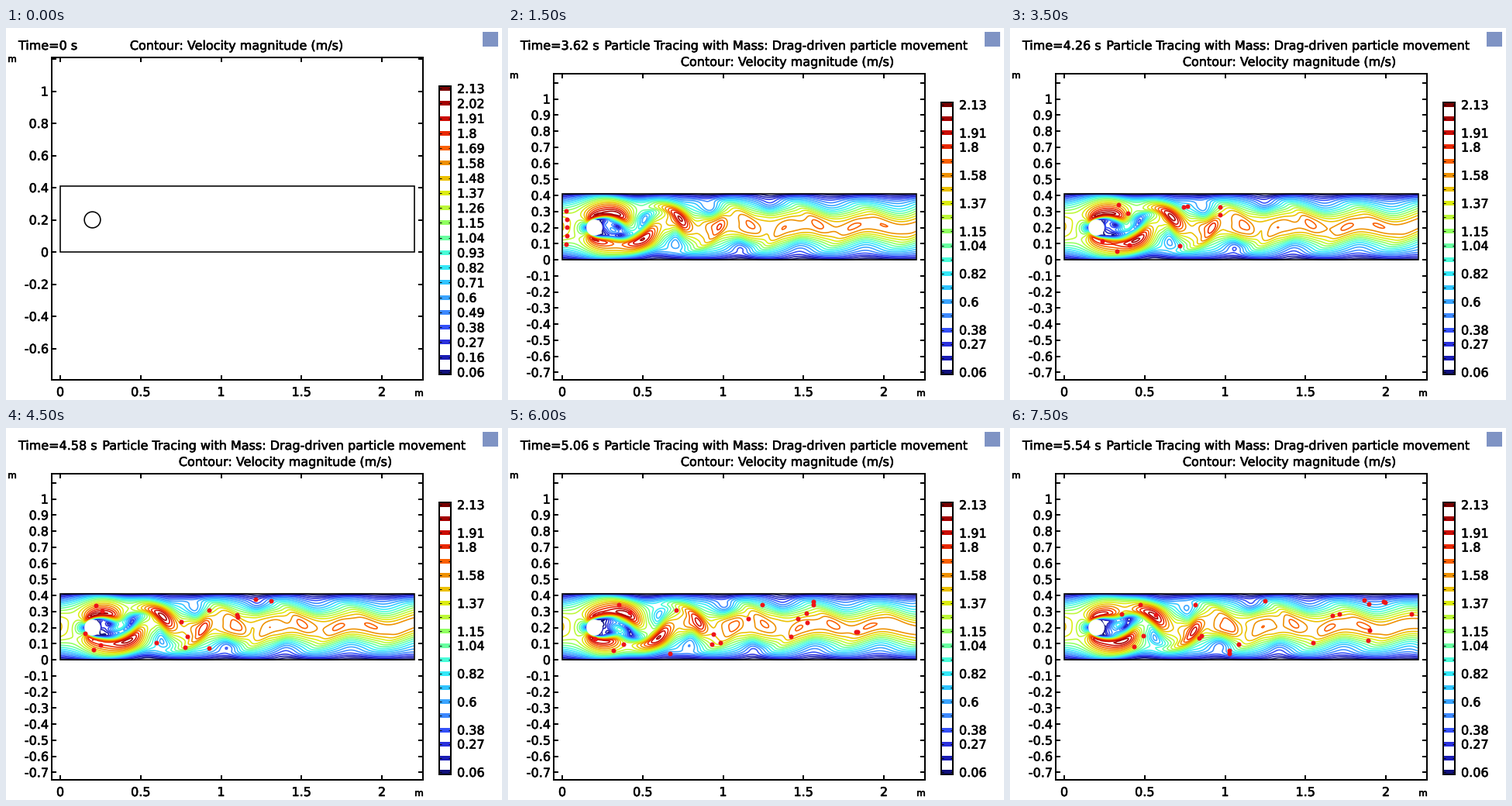
A matplotlib script that plays this animation: 640 px wide and 480 px high, repeating every 8000 ms.

```python
import numpy as np
import matplotlib.pyplot as plt
from matplotlib.animation import FuncAnimation
from matplotlib.patches import Circle, Rectangle
from matplotlib.patheffects import withStroke

# Channel flow past a cylinder at Re = 100 (SI units)
LENGTH, HEIGHT = 2.2, 0.41
CX, CY, R = 0.2, 0.2, 0.05
NU = 0.001
NY = 52
H = HEIGHT / NY
NX = round(LENGTH / H)
DT = 0.0014
STEPS = 3000

# Shedding cycle: upward flow peaks at PROBE_X at PEAK_TIME
PROBE_X, PEAK_TIME, PERIOD = 0.93, 4.58, 0.3406


def laplacian(n, last):
    m = np.diag(np.full(n, -2.0)) + np.eye(n, k=1) + np.eye(n, k=-1)
    m[0, 0], m[-1, -1] = -1, last
    vals, vecs = np.linalg.eigh(m)
    return vals, vecs.astype("f4")


LX, VX = laplacian(NX, -3)
LY, VY = laplacian(NY, -1)
INV = (1 / (LX[:, None] + LY[None, :])).astype("f4")
VXT, VYT = np.ascontiguousarray(VX.T), np.ascontiguousarray(VY.T)


def project(u, v):
    """Remove the divergence in place."""
    div = u[1:] - u[:-1] + v[:, 1:] - v[:, :-1]
    q = VX @ ((VXT @ div @ VY) * INV) @ VYT
    u[1:-1] -= q[1:] - q[:-1]
    u[-1] += 2 * q[-1]
    v[:, 1:-1] -= q[:, 1:] - q[:, :-1]


def grow(f, k):
    """Add two ghost layers; k = 1 when nodes lie on the walls."""
    f = np.concatenate((f[:1], f[:1], f, f[-1:], f[-1:]))
    m = f.shape[1]
    low, high = f[:, k:k + 2][:, ::-1], f[:, m - 2 - k:m - k][:, ::-1]
    return np.concatenate((-low, f, -high), axis=1)


def sweep(w, l2, l1, c, r1, r2):
    """Third-order upwind advection plus diffusion along one axis."""
    s = l1 + r1
    adv = w * (l2 - r2 + 8 * (r1 - l1)) + np.abs(w) * (l2 + r2 - 4 * s + 6 * c)
    return (NU / H ** 2) * (s - 2 * c) - adv * (1 / (12 * H))


def rate(g, a, b):
    c, gx, gy = g[2:-2, 2:-2], g[:, 2:-2], g[2:-2]
    return (sweep(a, gx[:-4], gx[1:-3], c, gx[3:-1], gx[4:])
            + sweep(b, gy[:, :-4], gy[:, 1:-3], c, gy[:, 3:-1], gy[:, 4:]))


def fluid_mask(x, y):
    r = np.hypot(x[:, None] - CX, y[None, :] - CY)
    return np.clip((r - R) / H + 0.8, 0, 1).astype("f4")


def centred(u, v):
    return np.stack((u[1:] + u[:-1], v[:, 1:] + v[:, :-1])) * 0.5


def simulate():
    xf, yf = np.arange(NX + 1) * H, np.arange(NY + 1) * H
    xc, yc = xf[:-1] + H / 2, yf[:-1] + H / 2
    mu, mv = fluid_mask(xf, yc), fluid_mask(xc, yf)
    s = yc / HEIGHT
    inlet = (6 * s * (1 - s)).astype("f4")
    u = mu * inlet
    kick = np.exp(-((xc[:, None] - 0.4) ** 2 + (yf - CY) ** 2) / 0.05 ** 2)
    v = (0.2 * kick).astype("f4") * mv
    v[:, 0] = v[:, -1] = 0
    project(u, v)

    old = None
    early, snaps, probe = None, [], []
    pi, pj = int(PROBE_X / H), round(CY / H)
    for n in range(1, STEPS + 1):
        gu, gv = grow(u, 0), grow(v, 1)
        sv = gv[1:-2] + gv[2:-1]
        su = gu[2:-3] + gu[3:-2]
        ru = rate(gu, u, (sv[:, 2:-3] + sv[:, 3:-2]) * 0.25)
        rv = rate(gv, (su[:, 1:-2] + su[:, 2:-1]) * 0.25, v)
        ou, ov = old or (ru, rv)
        u = (u + DT * (1.5 * ru - 0.5 * ou)) * mu
        v = (v + DT * (1.5 * rv - 0.5 * ov)) * mv
        old = ru, rv
        u[0] = inlet
        v[:, 0] = v[:, -1] = 0
        project(u, v)
        if n == round(1.6 / DT):
            early = centred(u, v)
        if n > STEPS - 800 and n % 4 == 0:
            snaps.append(centred(u, v))
            probe.append(v[pi, pj])

    # keep the last full cycle, starting at an upward zero crossing
    q = np.array(probe) - np.mean(probe)
    ups = np.flatnonzero((q[:-1] < 0) & (q[1:] >= 0)) + 1
    a, b = np.r_[0, len(q) - 1, ups][-2:]
    return early, snaps[a:b]


EARLY, CYCLE = simulate()


def field(t):
    phase = ((t - PEAK_TIME) / PERIOD + 0.25) % 1
    return CYCLE[int(phase * len(CYCLE))]


def sample(f, p):
    g = np.clip(p / H - 0.5, 0, [[NX - 1.01], [NY - 1.01]])
    i, j = g.astype(int)
    a, b = g - np.floor(g)
    return ((1 - a) * ((1 - b) * f[:, i, j] + b * f[:, i, j + 1])
            + a * ((1 - b) * f[:, i + 1, j] + b * f[:, i + 1, j + 1]))


def trace():
    """Five particles every 0.4 s from 3.6 s, dragged along by the flow."""
    step, tau = 0.01, 0.015
    seeds = np.array([np.zeros(5), np.linspace(0.1, 0.3, 5)])
    centre = np.array([[CX], [CY]])
    pos = vel = np.zeros((2, 0))
    path = []
    for n in range(200):
        f = field(3.6 + n * step)
        if n % 40 == 0:
            pos = np.hstack((pos, seeds))
            vel = np.hstack((vel, sample(f, seeds)))
        path.append(pos)
        flow = sample(f, pos)
        vel = flow + (vel - flow) * np.exp(-step / tau)
        pos = pos + vel * step
        # slide along the cylinder instead of entering it
        off = pos - centre
        dist = np.hypot(*off)
        pos = centre + off * np.maximum(1, (R + H) / dist)
        pos[1] = np.clip(pos[1], 0.01, HEIGHT - 0.01)
    return path


PATH = trace()

# Drawing, in pixels
SCALE, X0 = 207.5, 70
LABELS = ("2.13 2.02 1.91 1.8 1.69 1.58 1.48 1.37 1.26 1.15 "
          "1.04 0.93 0.82 0.71 0.6 0.49 0.38 0.27 0.16 0.06").split()
SPARSE = {0, 2, 3, 5, 7, 9, 10, 12, 14, 16, 17, 19}
LEVELS = np.linspace(0.06, 2.13, 20)
COLORS = ("#10107c #1a1cb4 #2a30dc #3450f8 #3a6cff #3c88ff #3aa4ff "
          "#30c4ff #34e8f8 #48fcd8 #68ffa0 #90ff60 #bcf838 #dcec10 "
          "#ecc000 #ee9000 #fa6000 #ea2800 #cc0c04 #a40000 #780000").split()
COLORS.remove("#3a6cff")

GX = np.r_[0, (np.arange(NX) + 0.5) * H, LENGTH] * SCALE + X0
GY = np.r_[0, (np.arange(NY) + 0.5) * H, HEIGHT] * SCALE

fig = plt.figure(figsize=(640 / 72, 480 / 72), dpi=72, facecolor="white")
ax = fig.add_axes([0, 0, 1, 1])


def text(x, y, s, ha="left", size=16):
    ax.text(x, y, s, ha=ha, va="baseline", size=size, family="DejaVu Sans",
            path_effects=[withStroke(linewidth=0.6, foreground="black")])


def line(x, y, w=2):
    ax.plot(x, y, color="black", lw=w, solid_capstyle="butt", zorder=6)


def box(x0, y0, x1, y1, w=2):
    ax.add_patch(Rectangle((x0, y0), x1 - x0, y1 - y0, fill=False,
                           ec="black", lw=w, zorder=6))


def axes_frame(top, base, step, lowest, highest):
    box(59, top, 538, 454)
    for k in range(lowest, highest + 1):
        val = round(k * step, 1)
        y = base - val * SCALE
        line([59, 65], [y, y])
        line([532, 538], [y, y])
        if val <= 1:
            text(55, y + 6, f"{val:g}", "right")
    for k in range(5):
        x = X0 + k * 0.5 * SCALE
        line([x, x], [448, 454])
        line([x, x], [top, top + 6])
        text(x, 475, f"{k * 0.5:g}", "center")
    text(8, top + 6, "m", "center", 12)
    text(533, 475, "m", "center", 12)


def legend(top, shown):
    for i, label in enumerate(LABELS):
        y = top + 3 + i * (441 - top) / 19
        ax.add_patch(Rectangle((559, y - 3), 15, 6, fc=COLORS[19 - i], lw=0))
        line([559, 562], [y, y], 1)
        line([571, 574], [y, y], 1)
        if i in shown:
            text(582, y + 6, label)
    box(559, top, 574, 447)


def geometry(base, edge):
    box(X0, base - HEIGHT * SCALE, X0 + LENGTH * SCALE, base, 1.6)
    ax.add_patch(Circle((X0 + CX * SCALE, base - CY * SCALE), R * SCALE,
                        fc="white", ec=edge, lw=1.6, zorder=4))


def contours(vel, base):
    speed = np.pad(np.hypot(*vel), ((1, 1), (0, 0)), mode="edge")
    speed = np.pad(speed, ((0, 0), (1, 1)))
    ax.contour(GX, base - GY, speed.T, levels=LEVELS, colors=COLORS,
               linewidths=1.6, zorder=2)


def draw(i):
    ax.clear()
    ax.set_xlim(0, 640)
    ax.set_ylim(480, 0)
    ax.axis("off")
    traced = i >= 3
    t = round(3.62 + 0.16 * (i - 3), 2) if traced else 1.6 * i
    base = 299 if traced else 289

    text(16, 28, f"Time={t:g} s")
    caption = "Contour: Velocity magnitude (m/s)"
    if traced:
        short = len(f"{t:g}") < 4
        text(351 if short else 360, 28, "Particle Tracing with Mass: "
             "Drag-driven particle movement", "center")
        text(354 if short else 361, 49, caption, "center")
        axes_frame(59, base, 0.1, -7, 11)
        legend(96, SPARSE)
    else:
        text(298, 28, caption, "center")
        axes_frame(38, base, 0.2, -3, 6)
        legend(75, range(20))
    ax.add_patch(Rectangle((615, 5), 20, 19, fc="#7f93c4", lw=0))

    geometry(base, "none" if i else "black")
    if i:
        contours(EARLY if i == 1 else field(t), base)
    if traced:
        x, y = PATH[2 + 16 * (i - 3)]
        keep = x < LENGTH
        ax.scatter(X0 + x[keep] * SCALE, base - y[keep] * SCALE, s=36,
                   color="#ee1418", lw=0, zorder=5)
    return []


anim = FuncAnimation(fig, draw, frames=16, interval=500, repeat=True,
                     repeat_delay=0)
plt.show()
```
